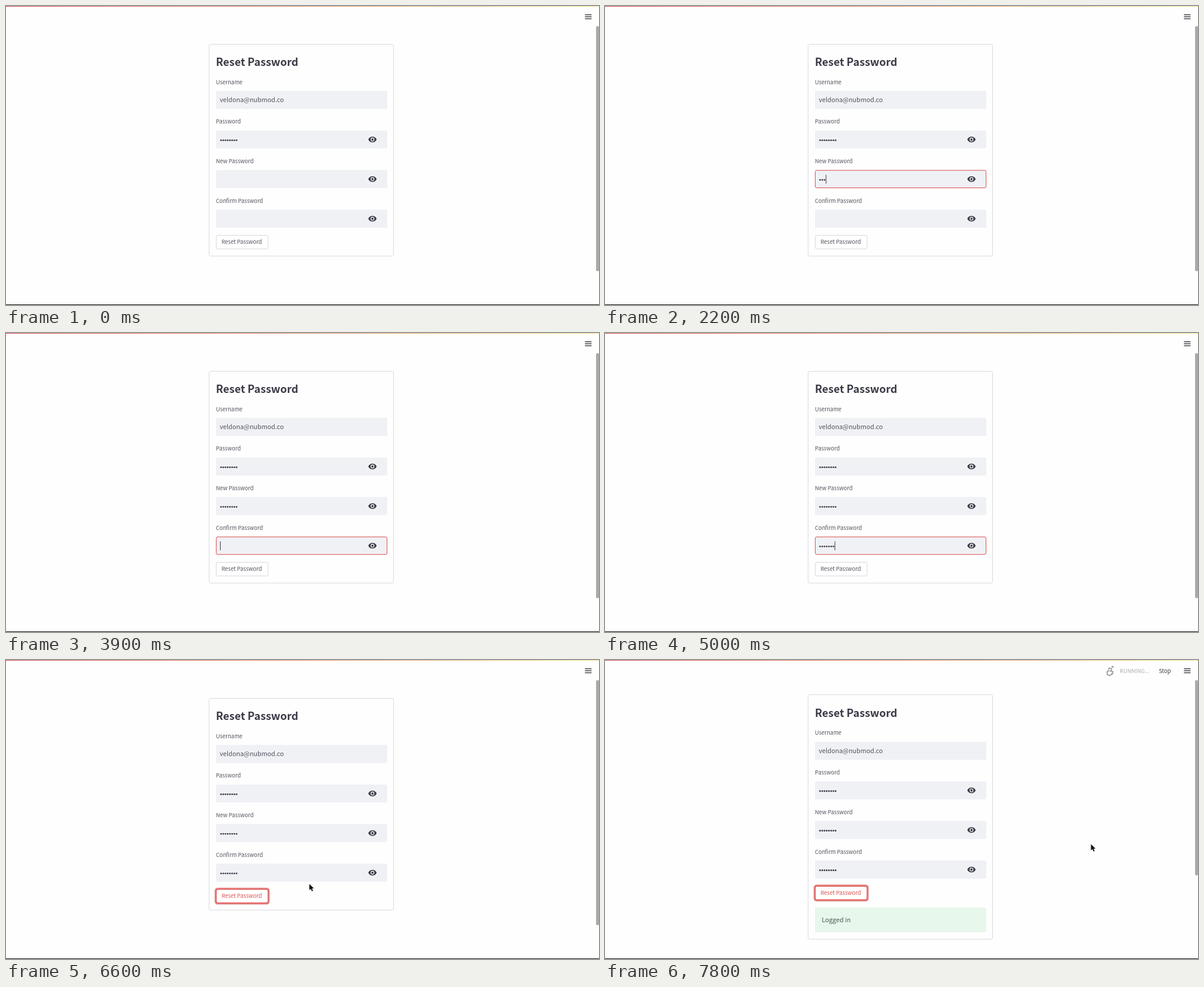
Recreate the animation shown at these times as an HTML page with a canvas. Size 1000 by 504 pixels, loop 8000 ms.

```html
<!DOCTYPE html>
<html lang="en">
<head>
<meta charset="utf-8">
<title>Reset Password</title>
<style>
  html, body { margin: 0; width: 100%; height: 100%; overflow: hidden; background: #fefefe; }
  canvas { display: block; width: 1000px; height: 504px; }
</style>
</head>
<body>
<canvas id="stage" width="1000" height="504"></canvas>
<script>
const ctx = document.getElementById('stage').getContext('2d');
const LOOP = 8000, STEP = 100;
const FAMILY = '"Noto Sans CJK JP", "Noto Sans CJK SC", "Noto Sans CJK", "Open Sans", sans-serif';
const INK = '#3a3b46', LABEL = '#53545e', RED = '#dc5050', GREY = '#a3a3a6';
const FIELD_X = 354, FIELD_W = 289, FIELD_H = 30.5, PITCH = 66.75;
const BLINK = 600;

const FOCUS_NEW = 1100, FOCUS_CONFIRM = 3600, PRESS = 6200, BLUR = 6300, RELEASE = 6500;
const RUNNING = 6700, GROWN = 6900;
const NEW_KEYS = [1800, 2100, 2200, 2300, 2400, 2600, 2900, 3100];
const CONFIRM_KEYS = [4100, 4400, 4500, 4600, 4700, 4900, 5000, 5200];

// Pointer way points: time, x, y
const ARRIVE = [[500, 560, 450], [700, 500, 350], [900, 450, 290], [1800, 450, 290]];
const LEAVE = [[5600, 450, 300], [5800, 440, 437], [6100, 423, 405], [6500, 423, 405],
  [6700, 600, 350], [7000, 816.5, 303.5], [7300, 819.5, 310.5], [8000, 819.5, 310.5]];

const EYE = new Path2D('M12 4.5C7 4.5 2.73 7.61 1 12c1.73 4.39 6 7.5 11 7.5s9.27-3.11 11-7.5' +
  'c-1.73-4.39-6-7.5-11-7.5zM12 17a5 5 0 1 1 0-10 5 5 0 0 1 0 10zM12 9a3 3 0 1 0 0 6 3 3 0 0 0 0-6z');
const ARROW = new Path2D('M0 0V10.5L2.5 8.2 4.3 12.2 6.2 11.4 4.5 7.5H7.6Z');
const HAND = new Path2D('M-1 1Q0-.8 1 1V5Q2.3 4 3 5.3 4.3 4.6 5 6 6.3 5.6 6.3 7V9.5L5.2 12.5H-.8' +
  'L-3.6 8.6Q-3.6 7-2.3 7.3L-1 8.5Z');
const RUNNER = new Path2D('M-3-3.5 0-4 3-3 4 0 6 .8M-3-3.5-4-.5M2-3.5.5 1 3 4V8M.5 1-1.5 4.5-6 4');
const CHAIR = new Path2D('M-3-3 0-4.5 2.5-3 .5 1 4.5 1.5 4 5.5M-2 0A4 4 0 1 0 2.5 5');

function text(str, x, y, size, color = LABEL, weight = 400) {
  ctx.font = `${weight} ${size}px ${FAMILY}`;
  ctx.fillStyle = color;
  ctx.fillText(str, x, y);
}

function box(x, y, w, h, r, fill, stroke, line = 1) {
  ctx.beginPath();
  ctx.roundRect(x, y, w, h, r);
  if (fill) { ctx.fillStyle = fill; ctx.fill(); }
  if (stroke) { ctx.strokeStyle = stroke; ctx.lineWidth = line; ctx.stroke(); }
}

function rect(x, y, w, h, fill) {
  ctx.fillStyle = fill;
  ctx.fillRect(x, y, w, h);
}

function disc(x, y, r, fill) {
  ctx.beginPath();
  ctx.arc(x, y, r, 0, 7);
  ctx.fillStyle = fill;
  ctx.fill();
}

function at(x, y, draw) {
  ctx.save();
  ctx.translate(x, y);
  draw();
  ctx.restore();
}

const typed = (keys, t) => keys.filter(k => k <= t).length;

function caretOn(focus, keys, t) {
  const last = Math.max(focus, ...keys.filter(k => k <= t));
  return Math.floor((t - last) / BLINK) % 2 === 0;
}

function field(row, label, { value, dots = 0, secret = true, focused, caret }) {
  const y = 143 + row * PITCH;
  text(label, FIELD_X, y - 11.4, 9.37);
  box(FIELD_X, y, FIELD_W, FIELD_H, 2.5, '#f0f1f5');
  if (focused) box(FIELD_X + .5, y + .5, FIELD_W - 1, FIELD_H - 1, 2.5, null, RED);
  if (value) text(value, 360.5, y + 19.2, 10.75, LABEL);
  for (let i = 0; i < dots; i++) disc(362.6 + i * 3.75, y + 16.6, 1.45, INK);
  if (caret) rect(361 + dots * 3.75, y + 8, 1, 15, INK);
  if (secret) at(618, y + 15.3, () => {
    ctx.scale(.64, .64);
    ctx.translate(-12, -12);
    ctx.fillStyle = INK;
    ctx.fill(EYE, 'evenodd');
  });
}

function button(t) {
  const active = t >= PRESS && t < RELEASE, hot = t >= 6000;
  if (t >= PRESS) box(353, 385, 90.5, 26, 4, null, active ? '#f39a9a' : '#e88f8f', 2.5);
  box(354.5, 386.5, 87.5, 23, 2.5, active ? '#ef4848' : '#fff', hot ? RED : '#d8d8dd', t >= RELEASE ? 1.4 : 1);
  text('Reset Password', 363.5, 401.3, 9.37, active ? '#fbd0c8' : hot ? RED : LABEL);
}

function alertBox(t) {
  ctx.globalAlpha = Math.min(1, .02 + ((t - GROWN) / 500) ** 1.6);
  box(FIELD_X, 417, FIELD_W, 42, 2.5, '#e8f7ec');
  text('Logged in', 365.5, 442, 10.75, '#4c5a55');
  ctx.globalAlpha = 1;
}

function status(t) {
  const chair = t >= 7600;
  at(852, 18, () => {
    ctx.strokeStyle = GREY;
    ctx.lineWidth = 2;
    ctx.lineJoin = ctx.lineCap = 'round';
    ctx.stroke(chair ? CHAIR : RUNNER);
    disc(chair ? 4 : 2.5, -6.5, 1.8, GREY);
  });
  text('RUNNING...', 868, 21.7, 9.37, '#adadb2');
  text('Stop', 934, 21.7, 9.37, INK);
}

function pointerPosition(t) {
  const path = [ARRIVE, LEAVE].find(p => t >= p[0][0] && t < p[p.length - 1][0]);
  if (!path) return null;
  const i = path.findIndex(p => p[0] > t);
  const [t0, x0, y0] = path[i - 1], [t1, x1, y1] = path[i];
  const k = (t - t0) / (t1 - t0);
  return [x0 + (x1 - x0) * k, y0 + (y1 - y0) * k];
}

function pointer(t) {
  const pos = pointerPosition(t);
  if (!pos) return;
  const [x, y] = pos;
  const inField = x > FIELD_X && x < 643 && y > 143 && y < 374 && (y - 143) % PITCH < FIELD_H;
  const onButton = x > 354 && x < 442 && y > 386 && y < 410;
  at(x, y, () => {
    ctx.lineWidth = 1;
    ctx.lineJoin = 'round';
    if (inField) {
      rect(-.5, -6, 1, 12, '#222');
      rect(-2.5, -6.5, 5, 1, '#222');
      rect(-2.5, 5.5, 5, 1, '#222');
      return;
    }
    ctx.fillStyle = onButton ? '#fff' : '#111';
    ctx.strokeStyle = onButton ? '#333' : '#fff';
    const shape = onButton ? HAND : ARROW;
    ctx.stroke(shape);
    ctx.fill(shape);
  });
}

function form(t) {
  const grown = t >= GROWN;
  const inNew = t >= FOCUS_NEW && t < FOCUS_CONFIRM;
  const inConfirm = t >= FOCUS_CONFIRM && t < BLUR;
  box(342.5, grown ? 58.5 : 64.5, 311, grown ? 412 : 357, 2.5, '#fefefe', '#dbdbe0');
  at(0, grown ? -5.3 : 0, () => {
    text('Reset Password', 354, 100.9, 18, INK, 600);
    field(0, 'Username', { value: 'veldona@nubmod.co', secret: false });
    field(1, 'Password', { dots: 8 });
    field(2, 'New Password', {
      dots: typed(NEW_KEYS, t), focused: inNew, caret: inNew && caretOn(FOCUS_NEW, NEW_KEYS, t)
    });
    field(3, 'Confirm Password', {
      dots: typed(CONFIRM_KEYS, t), focused: inConfirm,
      caret: inConfirm && t < PRESS && caretOn(FOCUS_CONFIRM, CONFIRM_KEYS, t)
    });
    button(t);
  });
  if (grown) alertBox(t);
}

function chrome(t) {
  const stripe = ctx.createLinearGradient(0, 0, 1000, 0);
  stripe.addColorStop(0, '#cf4a48');
  stripe.addColorStop(1, '#f3e08c');
  rect(0, 0, 1000, 1, stripe);
  rect(0, 503, 1000, 1, '#151515');
  box(995, 34, 5, t >= GROWN ? 329 : 413, 2, '#aaaaaa');
  for (const y of [14, 17.4, 20.8]) rect(976.3, y, 11.2, 1.4, INK);
  if (t >= RUNNING) status(t);
}

function draw(t) {
  rect(0, 0, 1000, 504, '#fefefe');
  chrome(t);
  form(t);
  pointer(t);
}

const start = performance.now();
function frame() {
  const t = (performance.now() - start) % LOOP;
  draw(Math.floor(t / STEP) * STEP);
  requestAnimationFrame(frame);
}
frame();
</script>
</body>
</html>
```
